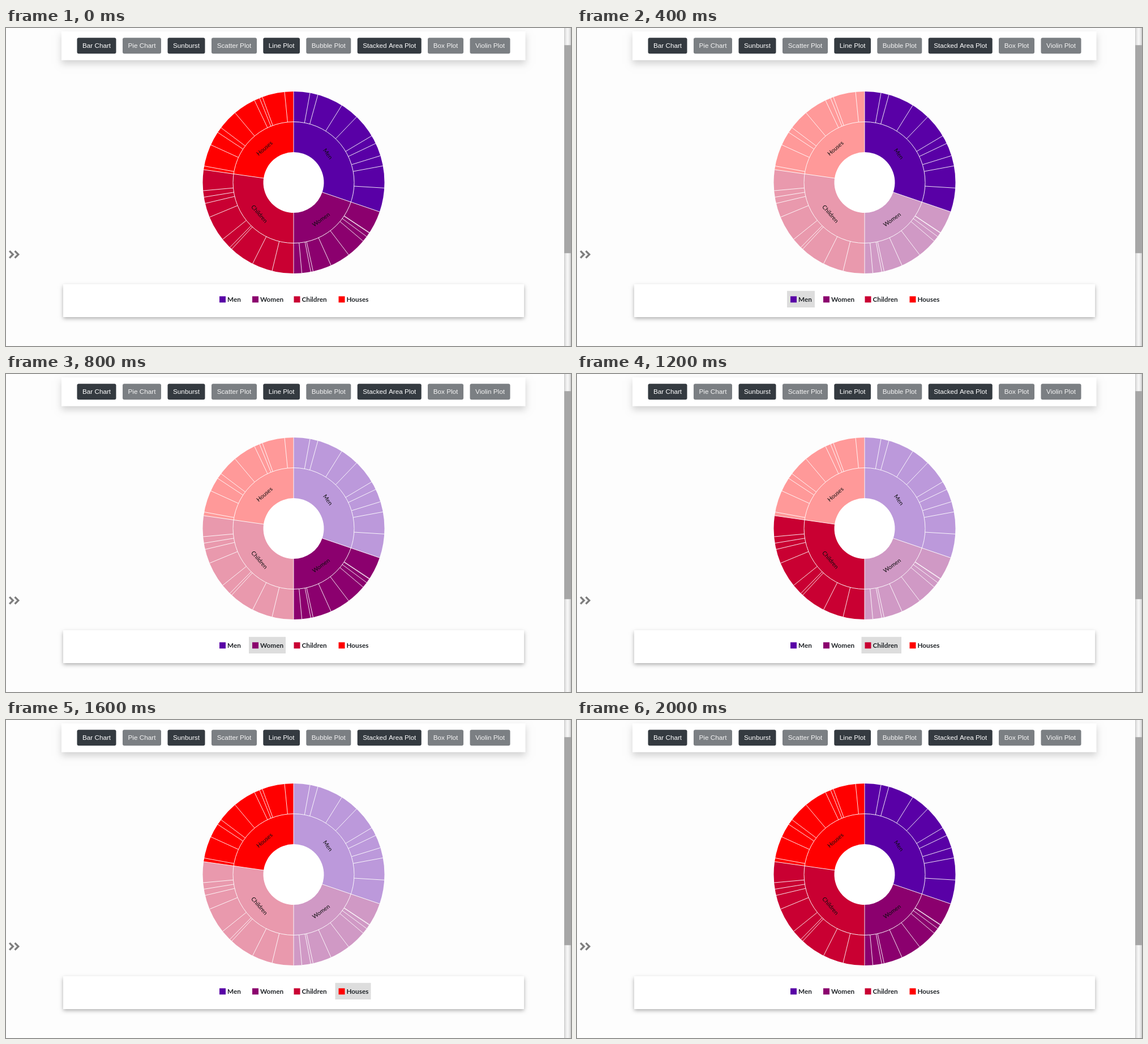
An HTML page with a canvas for the animation above (2.4 s loop, 998 by 561 pixels).

```html
<!DOCTYPE html>
<html lang="en">
<head>
<meta charset="utf-8">
<title>Sunburst</title>
<style>
  html, body { margin: 0; width: 100%; height: 100%; overflow: hidden; background: #fdfdfd; }
  canvas { display: block; width: 998px; height: 561px; }
</style>
</head>
<body>
<canvas id="stage"></canvas>
<script>
const W = 998, H = 561, STEP = 400, LOOP = 2400;
const CX = 508, CY = 272.5, RING = 53.5;
const TEXT = 11.74;
const canvas = document.getElementById('stage');
const ctx = canvas.getContext('2d');
const dpr = window.devicePixelRatio || 1;
canvas.width = W * dpr;
canvas.height = H * dpr;

// cuts: slice borders in degrees, clockwise from the top
const groups = [
  { name: 'Men', color: '#5900a6', label: [568.3, 222, 54.4], item: [371, 49],
    cuts: [0, 10.4, 15.5, 32, 43.9, 59.2, 64.6, 72.9, 79.5, 93.5, 108.8] },
  { name: 'Women', color: '#8b006e', label: [556.5, 338, -35.6], item: [429, 65],
    cuts: [108.8, 123.4, 123.7, 126.5, 130.1, 142.7, 155.7, 167.6, 169.1, 174.8, 180] },
  { name: 'Children', color: '#c90032', label: [447.5, 328, 49.1], item: [502.5, 70.5],
    cuts: [180, 193.7, 206.8, 222.9, 224.5, 231.3, 247.6, 256.7, 260.7, 264.8, 278.1] },
  { name: 'Houses', color: '#ff0000', label: [456.7, 212.3, -40.9], item: [581.5, 63],
    cuts: [278.1, 280.4, 294.4, 303.4, 307, 319.9, 334.5, 338, 339.9, 354.3, 360] }
];

// name, left edge, width, enabled
const buttons = [
  ['Bar Chart', 125.5, 69, true],
  ['Pie Chart', 206, 68, false],
  ['Sunburst', 285.5, 66, true],
  ['Scatter Plot', 363, 80, false],
  ['Line Plot', 454.3, 64.7, true],
  ['Bubble Plot', 530.3, 79, false],
  ['Stacked Area Plot', 620.7, 113, true],
  ['Box Plot', 745, 63, false],
  ['Violin Plot', 819.5, 71, false]
];

function rect(x, y, w, h, color, radius = 0) {
  ctx.fillStyle = color;
  ctx.beginPath();
  ctx.roundRect(x, y, w, h, radius);
  ctx.fill();
}

function text(str, x, y, font, color, align) {
  ctx.font = font;
  ctx.fillStyle = color;
  ctx.textAlign = align;
  ctx.fillText(str, x, y);
}

function card(x, y, w, h, drop, blur, alpha) {
  ctx.save();
  ctx.shadowColor = `rgba(0,0,0,${alpha})`;
  ctx.shadowOffsetY = drop * dpr;
  ctx.shadowBlur = blur * dpr;
  rect(x, y, w, h, '#fff');
  ctx.restore();
}

function drawToolbar() {
  card(98, 6, 819.5, 50.7, 5.9, 11.7, 0.17);
  for (const [name, x, w, on] of buttons) {
    rect(x, 17.2, w, 28, on ? '#343a40' : '#7b7f83', 3);
    text(name, x + w / 2, 35.2, `${TEXT}px "Liberation Sans", Arial, sans-serif`,
      on ? '#fff' : '#f4f4f4', 'center');
  }
}

function slice(from, to, inner, color, alpha) {
  const a = (from - 90) * Math.PI / 180, b = (to - 90) * Math.PI / 180;
  ctx.beginPath();
  ctx.arc(CX, CY, inner + RING, a, b);
  ctx.arc(CX, CY, inner, b, a, true);
  ctx.closePath();
  ctx.globalAlpha = alpha;
  ctx.fillStyle = color;
  ctx.fill();
  ctx.globalAlpha = 1;
}

// Borders go on top of every fill, so each one is drawn once.
function drawBorders() {
  ctx.strokeStyle = '#fff';
  ctx.lineWidth = 0.9;
  ctx.beginPath();
  ctx.arc(CX, CY, 2 * RING, 0, 2 * Math.PI);
  for (const { cuts } of groups) {
    cuts.slice(0, -1).forEach((deg, i) => {
      const a = (deg - 90) * Math.PI / 180, r = i ? 2 * RING : RING;
      ctx.moveTo(CX + r * Math.cos(a), CY + r * Math.sin(a));
      ctx.lineTo(CX + 3 * RING * Math.cos(a), CY + 3 * RING * Math.sin(a));
    });
  }
  ctx.stroke();
}

function drawSunburst(active) {
  ctx.fillStyle = '#fff';
  ctx.beginPath();
  ctx.arc(CX, CY, 3 * RING, 0, 2 * Math.PI);
  ctx.fill();
  groups.forEach(({ cuts, color }, i) => {
    const alpha = active < 0 || active === i ? 1 : 0.4;
    slice(cuts[0], cuts[cuts.length - 1], RING, color, alpha);
    slice(cuts[0], cuts[cuts.length - 1], 2 * RING, color, alpha);
  });
  drawBorders();
  for (const { name, label: [x, y, deg] } of groups) {
    ctx.save();
    ctx.translate(x, y);
    ctx.rotate(deg * Math.PI / 180);
    text(name, 0, 3.4, '10.2px Lato, sans-serif', '#0c0c0c', 'center');
    ctx.restore();
  }
}

function drawLegend(active) {
  card(101, 452, 814, 58, 2.9, 7, 0.32);
  groups.forEach(({ name, color, item: [x, w] }, i) => {
    if (i === active) rect(x, 463.7, w, 29.3, '#dddddd');
    rect(x + 6, 473.3, 11, 11, color);
    text(name, x + 20, 482.7, `bold ${TEXT}px Lato, sans-serif`, '#212529', 'left');
  });
}

function drawChevrons() {
  ctx.strokeStyle = '#7d7d7d';
  ctx.lineWidth = 3.3;
  ctx.beginPath();
  for (const x of [6.2, 15.6]) {
    ctx.moveTo(x, 393.3);
    ctx.lineTo(x + 6.2, 399.5);
    ctx.lineTo(x, 405.7);
  }
  ctx.stroke();
}

function drawScrollbar() {
  const shade = ctx.createLinearGradient(986, 0, 998, 0);
  [[0, '#c6c6c6'], [0.2, '#e6e6e6'], [0.5, '#f8f8f8'], [0.8, '#e6e6e6'], [1, '#c6c6c6']]
    .forEach(([at, color]) => shade.addColorStop(at, color));
  rect(986, 0, 12, H, shade);
  rect(986, 30.3, 12, 367, '#a6a6a6');
}

function draw(now) {
  const step = Math.floor((now % LOOP) / STEP);
  const active = step >= 1 && step <= 4 ? step - 1 : -1;
  ctx.setTransform(dpr, 0, 0, dpr, 0, 0);
  rect(0, 0, W, H, '#fdfdfd');
  drawToolbar();
  drawSunburst(active);
  drawLegend(active);
  drawChevrons();
  drawScrollbar();
}

const start = performance.now();
function tick() {
  draw(performance.now() - start);
  requestAnimationFrame(tick);
}
tick();
</script>
</body>
</html>
```
